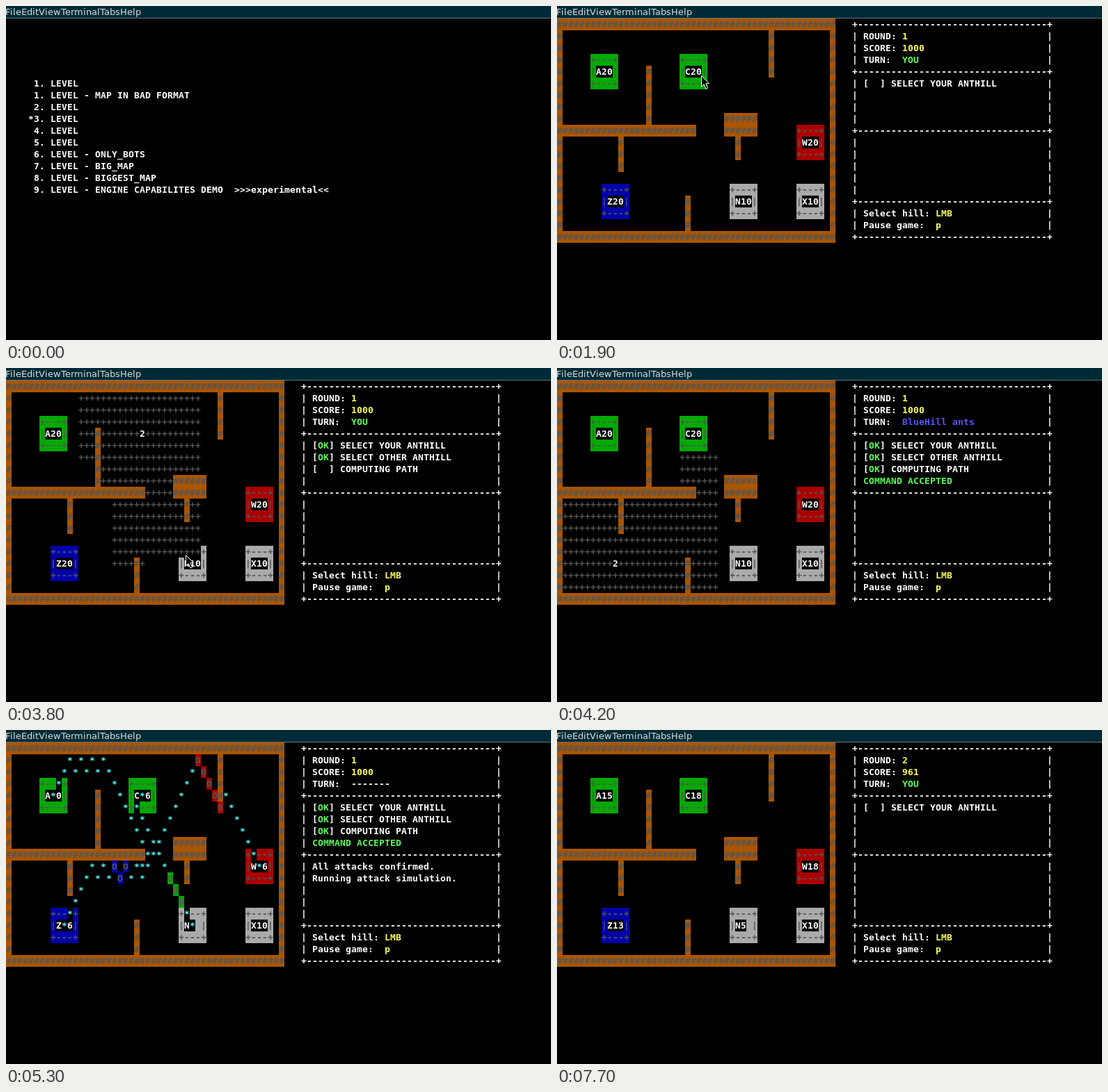
These frames come from a looping animation (783x481 px, 7900 ms). An HTML page with a canvas:

```html
<!DOCTYPE html>
<html lang="en">
<head>
<meta charset="utf-8">
<title>Anthill terminal game</title>
<style>
html, body { margin: 0; width: 100%; height: 100%; overflow: hidden; background: #000; }
canvas { display: block; }
</style>
</head>
<body>
<canvas id="stage" width="783" height="481"></canvas>
<script>
const ctx = document.getElementById('stage').getContext('2d');
const LOOP = 7900, STEP = 100;
const CW = 8, CH = 17, TOP = 18, COLS = 50, ROWS = 19;
const GRAY = '#555555', WHITE = '#ffffff', GREEN = '#55ff55', YELLOW = '#ffff55',
  BLUE = '#5555ff', RED = '#ff5555', CYAN = '#55ffff';
const MONO = 'bold 13px "DejaVu Sans Mono", monospace';
const SANS = '13px "DejaVu Sans", sans-serif';

// Key moments in ms
const GAME = 400, PICKED = 2400, SEARCH = 3800, ACCEPTED = 3900, BLUE_TURN = 4000,
  RED_TURN = 4600, FIGHT = 4800, ROUND2 = 7600;

const MENU = [' 1. LEVEL', ' 1. LEVEL - MAP IN BAD FORMAT', ' 2. LEVEL', '*3. LEVEL', ' 4. LEVEL',
  ' 5. LEVEL', ' 6. LEVEL - ONLY_BOTS', ' 7. LEVEL - BIG_MAP', ' 8. LEVEL - BIGGEST_MAP',
  ' 9. LEVEL - ENGINE CAPABILITES DEMO  >>>experimental<<'];

const WALLS = new Set();
function wall(x, y, w, h) {
  for (let i = 0; i < w * h; i++) WALLS.add((y + Math.floor(i / w)) * COLS + x + i % w);
}
for (const y of [0, ROWS - 1]) wall(0, y, COLS, 1);
for (const x of [0, COLS - 1]) wall(x, 0, 1, ROWS);
wall(38, 1, 1, 4);
wall(16, 4, 1, 5);
wall(0, 9, 25, 1);
wall(30, 8, 6, 2);
wall(32, 10, 1, 2);
wall(11, 10, 1, 3);
wall(23, 15, 1, 3);

// x and y are the centre cell; a sender loses ants when the fight starts, a victim when hit
const A = { name: 'A', x: 8, y: 4, color: '#00aa00', ants: 20, hit: 6400 };
const C = { name: 'C', x: 24, y: 4, color: '#00aa00', ants: 20, sends: true };
const W = { name: 'W', x: 45, y: 10, color: '#aa0000', ants: 20, sends: true };
const Z = { name: 'Z', x: 10, y: 15, color: '#0000aa', ants: 20, sends: true, hit: 6700 };
const N = { name: 'N', x: 33, y: 15, color: '#aaaaaa', ants: 10, hit: 5300 };
const X = { name: 'X', x: 45, y: 15, color: '#aaaaaa', ants: 10 };
const HILLS = [A, C, W, Z, N, X];

function antCount({ ants, sends, hit }, t) {
  const regrown = Math.min(3, Math.floor((t - FIGHT) / 500));
  return ants - (sends && t >= FIGHT ? 5 - regrown : 0) - (t >= hit ? 5 : 0);
}

const hillAt = (x, y) => HILLS.find(h => Math.abs(h.x - x) < 3 && Math.abs(h.y - y) < 2);

// Legs are [dx, moves]; u, d and - are one row up, down or level
function path({ x, y }, legs) {
  const cells = [[x, y]];
  for (const [dx, moves] of legs) {
    for (const m of moves) {
      x += dx;
      y += m === 'd' ? 1 : m === 'u' ? -1 : 0;
      cells.push([x, y]);
    }
  }
  return cells;
}

// Breadth-first distances in eight directions; uninvolved hills block the way
function flood(from, to) {
  const seen = new Set([from.y * COLS + from.x]);
  const queue = [[from.x, from.y, 0]];
  for (const [x, y, d] of queue) {
    for (let i = 0; i < 9; i++) {
      const nx = x - 1 + Math.floor(i / 3), ny = y - 1 + i % 3, key = ny * COLS + nx;
      const hill = hillAt(nx, ny);
      if (seen.has(key) || WALLS.has(key) || (hill && hill !== from && hill !== to)) continue;
      seen.add(key);
      queue.push([nx, ny, d + 1]);
    }
  }
  return queue.slice(1);
}

function attack(from, to, ...legs) {
  return { cells: path(from, legs), area: flood(from, to), color: from.color, end: to.hit + STEP };
}

const zigzag = 'du'.repeat(4);
const player = attack(C, N, [-1, 'd'], [1, 'd'.repeat(10)]);
const blue = attack(Z, A, [1, 'uuuuu' + zigzag + '-u'], [-1, 'u'.repeat(8) + 'dududu' + 'ddd']);
const red = attack(W, Z, [-1, 'uuuuuuduuuu' + 'd'.repeat(10) + 'u' + zigzag + 'ddddd']);

function put(x, y, str, color = WHITE, bg = '#000') {
  ctx.fillStyle = bg;
  ctx.fillRect(x * CW, TOP + y * CH, str.length * CW, CH);
  ctx.fillStyle = color;
  ctx.font = MONO;
  [...str].forEach((ch, i) => {
    if (ch !== ' ') ctx.fillText(ch, (x + i) * CW, TOP + y * CH + 13);
  });
}

// Letters advance by whole pixels, as in a hinted menu bar
function drawTitle() {
  ctx.fillStyle = '#002b36';
  ctx.fillRect(0, 0, 783, 17);
  ctx.fillStyle = '#5c7a80';
  ctx.fillRect(0, 17, 783, 1);
  ctx.fillStyle = '#d8dfe0';
  ctx.font = SANS;
  const width = s => ctx.measureText(s).width;
  const title = 'FileEditViewTerminalTabsHelp';
  let x = -1;
  [...title].forEach((ch, i) => {
    const next = title[i + 1] || '';
    ctx.fillText(ch, x, 13);
    x += Math.round(width(ch + next) - width(next));
  });
}

function drawMap(t) {
  for (const key of WALLS) put(key % COLS, Math.floor(key / COLS), '#', GRAY, '#aa5500');
  for (const hill of HILLS) {
    const { name, x, y, color } = hill;
    ['+---+', '|   |', '+---+'].forEach((s, i) => put(x - 2, y - 1 + i, s, GRAY, color));
    put(x - 1, y, name + antCount(hill, t));
  }
}

function turn(t) {
  if (t < BLUE_TURN || t >= ROUND2) return ['YOU', GREEN];
  if (t < RED_TURN) return ['BlueHill ants', BLUE];
  return t < FIGHT ? ['RedHill ants', RED] : ['-------', WHITE];
}

function drawPanel(t) {
  const next = t >= ROUND2;
  const u = next ? GAME : t;
  for (let r = 0; r < ROWS; r++) {
    if ([0, 4, 9, 15, 18].includes(r)) put(53, r, '+' + '-'.repeat(34) + '+');
    else { put(53, r, '|'); put(88, r, '|'); }
  }
  const field = (row, label, col, value, color = YELLOW) => {
    put(55, row, label);
    put(col, row, value, color);
  };
  field(1, 'ROUND:', 62, next ? '2' : '1');
  field(2, 'SCORE:', 62, next ? '961' : '1000');
  field(3, 'TURN:', 62, ...turn(t));
  field(16, 'Select hill:', 68, 'LMB');
  field(17, 'Pause game:', 68, 'p');

  const times = [GAME, PICKED, SEARCH, ACCEPTED];
  ['SELECT YOUR ANTHILL', 'SELECT OTHER ANTHILL', 'COMPUTING PATH'].forEach((label, i) => {
    if (u < times[i]) return;
    put(55, 5 + i, '[  ] ' + label);
    if (u >= times[i + 1]) put(56, 5 + i, 'OK', GREEN);
  });
  if (u >= ACCEPTED) put(55, 8, 'COMMAND ACCEPTED', GREEN);
  if (u >= FIGHT) {
    put(55, 10, 'All attacks confirmed.');
    put(55, 11, 'Running attack simulation.');
  }
}

function drawSearch({ area, cells }, reached, found) {
  for (const [x, y, d] of area) if (reached(x, y, d)) put(x, y, '+', GRAY);
  if (found) for (const [x, y] of cells) put(x, y, '*', GREEN);
}

// The last ring of a search is only partly visited
function drawSearches(t) {
  if (t < ACCEPTED) drawSearch(player, (x, y, d) => d < 11 || (d === 11 && x <= C.x));
  else if (t < BLUE_TURN) drawSearch(player, (x, y, d) => d < 12, true);
  else if (t < RED_TURN) {
    const ring = Math.min(33, (t - ACCEPTED) * 0.06);
    drawSearch(blue, (x, y, d) => d < ring || (d === ring && (x > A.x || y < A.y)), t >= RED_TURN - STEP);
  } else drawSearch(red, (x, y, d) => d <= (t - RED_TURN + STEP) * 0.18, t > RED_TURN);
}

function drawAttacks(t) {
  const head = Math.min(34, Math.round(11 + (t - 5300) * 17 / 900));
  const live = [player, blue, red].filter(a => t < a.end);
  for (const { cells } of live)
    for (const [x, y] of cells)
      if (t <= N.hit || !hillAt(x, y)) put(x, y, '*', CYAN);
  for (const a of live) {
    const size = a === blue && t <= N.hit ? 3 : 5;
    for (const [x, y] of a.cells.slice(Math.max(0, head - size + 1), head + 1))
      if (!hillAt(x, y)) put(x, y, 'O', GRAY, a.color);
  }
}

// Visible from show to hide; glides along a quadratic curve with an ease-out between start and end
const TRIPS = [
  { show: 1100, start: 1200, end: 1900, hide: 2400, curve: [[538, 118], [372, 165], [207, 100]] },
  { show: 2400, start: 2800, end: 3200, hide: 3900, curve: [[212, 108], [290, 180], [258, 269]] },
  { show: 6700, start: 6700, end: 6900, hide: 7500, curve: [[585, 300], [522, 266], [460, 232]] },
  { show: 7500, start: 7500, end: 7700, hide: LOOP, curve: [[460, 232], [260, 107], [61, -17]] }
];

function drawPointer(t) {
  const trip = TRIPS.find(({ show, hide }) => t >= show && t < hide);
  if (!trip) return;
  const q = Math.min(1, Math.max(0, (t - trip.start) / (trip.end - trip.start)));
  const p = 1 - (1 - q) ** 3;
  const [a, b, c] = trip.curve;
  const [x, y] = [0, 1].map(i =>
    Math.round((1 - p) ** 2 * a[i] + 2 * p * (1 - p) * b[i] + p * p * c[i]));
  ctx.save();
  ctx.translate(x + 0.5, y + 0.5);
  ctx.fillStyle = '#000';
  ctx.strokeStyle = WHITE;
  const arrow = new Path2D('M0 0V15.5L3.6 12.3 6.6 18.6 9.2 17.4 6.3 11.3 11 11Z');
  ctx.fill(arrow);
  ctx.stroke(arrow);
  ctx.restore();
}

function draw(t) {
  ctx.fillStyle = '#000';
  ctx.fillRect(0, 0, 783, 481);
  drawTitle();
  if (t < GAME) {
    MENU.forEach((line, i) => put(4, 5 + i, line));
    return;
  }
  drawMap(t);
  drawPanel(t);
  if (t >= SEARCH && t < FIGHT) drawSearches(t);
  if (t >= FIGHT) drawAttacks(t);
  drawPointer(t);
}

let shown = -1;
function tick() {
  const t = Math.floor(performance.now() % LOOP / STEP) * STEP;
  if (t !== shown) draw(shown = t);
  requestAnimationFrame(tick);
}
tick();
</script>
</body>
</html>
```
